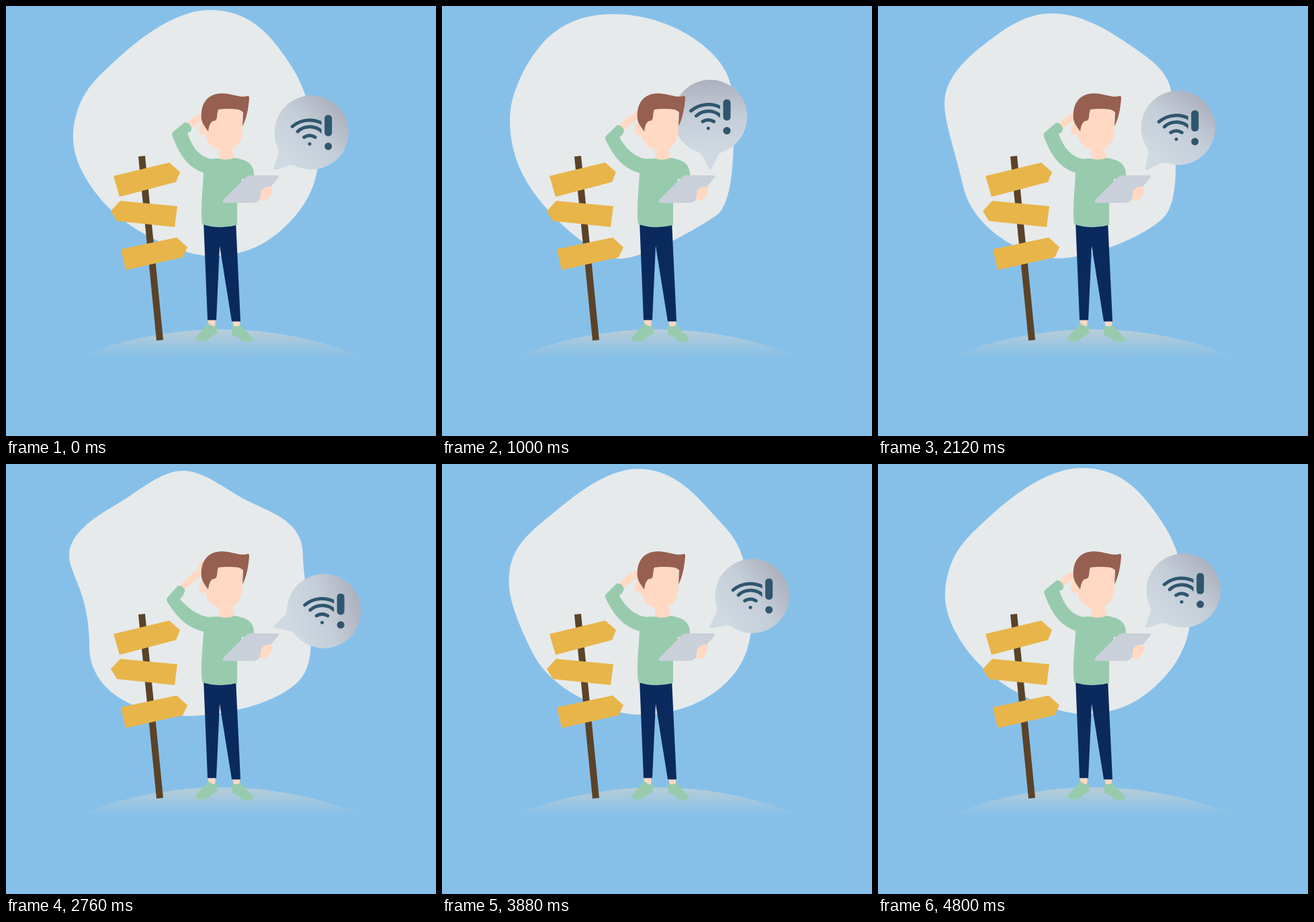
These frames come from a looping animation (640x640 px, 4840 ms). An HTML page:

```html
<!DOCTYPE html>
<html lang="en">
<head>
<meta charset="utf-8">
<title>Lost signal</title>
<style>
  html, body { margin: 0; height: 100%; overflow: hidden; background: #86c0e9; }
  svg { display: block; width: 100vw; height: 100vh; }
  .green { fill: #98cbae; }
  .skin { fill: #ffd9c3; }
  .light { fill: #e6eaeb; }
  .icon { fill: #2f566e; }
  .waves { fill: none; stroke: #2f566e; stroke-width: 5; stroke-linecap: round; }
</style>
</head>
<body>
<svg viewBox="0 0 640 640">
  <defs>
    <linearGradient id="bubbleFill" gradientUnits="userSpaceOnUse" x1="0" y1="-24" x2="0" y2="-134">
      <stop offset="0" stop-color="#cfd9e2"/>
      <stop offset=".5" stop-color="#c5ced8"/>
      <stop offset="1" stop-color="#acb0bd"/>
    </linearGradient>
    <linearGradient id="hillFill" x1="0" y1="0" x2="0" y2="1">
      <stop offset="0" stop-color="#b8cdd8"/>
      <stop offset=".95" stop-color="#86c0e9"/>
    </linearGradient>
    <clipPath id="cut"><rect x="-40" y="-40" width="55" height="80"/></clipPath>
  </defs>

  <path id="blob" class="light"/>
  <path fill="url(#hillFill)" d="M102 525A566 566 0 0 1 538 525Z"/>

  <g id="bubble" fill="url(#bubbleFill)">
    <path d="M0 -133.3A55.3 55.3 0 0 1 22 -27.3Q13 -25 10 -17L2 -1Q0 2 -2 -1L-10 -17Q-13 -25 -22 -27.3A55.3 55.3 0 0 1 0 -133.3Z"/>
  </g>
  <g id="signal" class="icon">
    <g class="waves" clip-path="url(#cut)">
      <path d="M-28.5 -9A40 40 0 0 1 19 -12M-20.5 -1.5A26.6 26.6 0 0 1 17 0M-11 7Q-2.7 2 5.6 7"/>
    </g>
    <circle cx="-2.7" cy="17" r="2.5"/>
    <rect x="19.5" y="-26" width="11" height="31.5" rx="5"/>
    <circle cx="25" cy="20.5" r="5.5"/>
  </g>

  <path fill="#5a4328" d="M197 224L207 223L234 497L224 498Z"/>
  <path fill="#e8b54a" d="M160 253L243 233L259 247L253 262L169 284ZM156 305L170 290L255 298L251 329L165 320ZM171 362L254 344.5L270 359L263 374L178 393Z"/>

  <path class="skin" d="M300 466H312L311 477H302ZM337 468H349L347 478H339Z"/>
  <path class="green" d="M301 472C297 479 287 486 282 495C282 500 297 502 304 494C307 490 313 490 314 486V476Q308 478 301 472ZM337 475L336 488C338 492 343 490 346 494C352 502 366 502 368 497C366 489 354 484 350 474Q343 479 337 475Z"/>
  <path fill="#0a2a5e" d="M294 320L300 467.500H313L318 357L336 469.500H349L342 320Z"/>

  <path id="forearm" class="skin"/>
  <path class="skin" d="M317 208V228Q328 235 340 227L336 208Z"/>
  <path class="green" d="M300 228Q309 227 317 227Q328 231 340 226C360 229 369 236 369 251V262L344 270V326Q318 333 292 325C289 300 293 275 294 248Z"/>
  <path id="sleeve" class="green"/>
  <path class="light" d="M351 257L355 258L351 263Z"/>
  <path fill="#cad0d9" d="M364 252H403Q408 252 405 256L377 289Q373 293 368 293H325Q321 292 324 288L357 255Q360 252 364 252Z"/>
  <path class="skin" d="M396 270C390 267 383 270 380 275Q379 282 378 287Q380 291 384 290C390 288 396 281 396 275Z"/>

  <ellipse class="skin" cx="293.500" cy="183" rx="6.500" ry="9.500"/>
  <path class="skin" d="M297 165L314 150H352V182C352 204 340 215 325 215C308 215 298 204 297 190Z"/>
  <path fill="#965f50" d="M301 187C297 180 292 176 291 168C289 145 300 130 322 130C340 131 348 137 359 134Q362 133 362 137C361 152 358 168 352 179L353 158Q351 156 346 154Q330 152 316 154C313 160 316 170 310 171C306 170 302 176 301 187Z"/>
</svg>
<script>
const LOOP = 4840;
const $ = id => document.getElementById(id);
const lerp = (a, b, k) => a + (b - a) * k;

// Each move eases from one whole step to the next between its two times.
const bubbleMoves = [[0, 965], [1515, 2690], [3372, 4172]];
const armMoves = [[0, 560], [560, 1480], [1960, 2760], [3360, 4480]];

const bubbleAngles = [45.5, 0, 72, 45.5];

const egg = 'M303 6C358 6 388 36 415 75S441 122 455 160S476 260 430 313S340 372 303 372S182 338 139 285S95 195 105 160S135 107 162 82S248 6 303 6Z';
const pebble = 'M255 12C310 12 362 34 395 64S432 118 433 145S440 290 408 312S300 376 265 376S162 318 130 268S97 165 106 135S131 76 150 55S200 12 255 12Z';
const star = 'M263 10C296 10 326 38 360 55S442 85 442 135S470 280 440 318S325 375 270 375S124 350 124 270S94 165 94 135S130 80 163 61S230 10 263 10Z';
const blobs = [egg, pebble, star, egg];

const sleeves = [
  'M303 227C288 224 277 210 270 189Q277 187 276 181Q273 173 266 173L249 187Q246 190 248 194C258 222 271 241 296 249Z',
  'M303 228C285 226 268 212 259 201Q267 193 266 187Q263 181 256 181L240 199Q238 202 240 205C255 229 270 245 297 250Z'
];
const forearms = [
  'M269 176Q278 163 291 160L300 165L292 171L274 183Z',
  'M257 183Q273 164 285 158L291 142L298 160L264 188Z'
];

// How many moves are done at time t, with the current one as an eased fraction.
function progress(moves, t) {
  return moves.reduce((sum, [start, end]) => {
    const x = Math.min(1, Math.max(0, (t - start) / (end - start)));
    return sum + x * x * (3 - 2 * x);
  }, 0);
}

// Path between two paths that share the same commands.
function mixPaths(a, b, k) {
  const ends = b.match(/\d+/g);
  let i = 0;
  return a.replace(/\d+/g, n => lerp(+n, +ends[i++], k).toFixed(2));
}

// Value at a fractional position in a list of poses.
function between(poses, position, mix) {
  const i = Math.min(Math.floor(position), poses.length - 2);
  return mix(poses[i], poses[i + 1], position - i);
}

function draw() {
  const t = performance.now() % LOOP;
  const stage = progress(bubbleMoves, t);
  const angle = between(bubbleAngles, stage, lerp);
  const rad = angle * Math.PI / 180;
  const arm = 1 - Math.abs(1 - progress(armMoves, t) % 2);

  $('blob').setAttribute('d', between(blobs, stage, mixPaths));
  $('bubble').setAttribute('transform', `translate(399 243) rotate(${angle})`);
  $('signal').setAttribute('transform', `translate(${399 + 78 * Math.sin(rad)} ${243 - 78 * Math.cos(rad)})`);
  $('sleeve').setAttribute('d', mixPaths(...sleeves, arm));
  $('forearm').setAttribute('d', mixPaths(...forearms, arm));
  requestAnimationFrame(draw);
}
draw();
</script>
</body>
</html>
```
